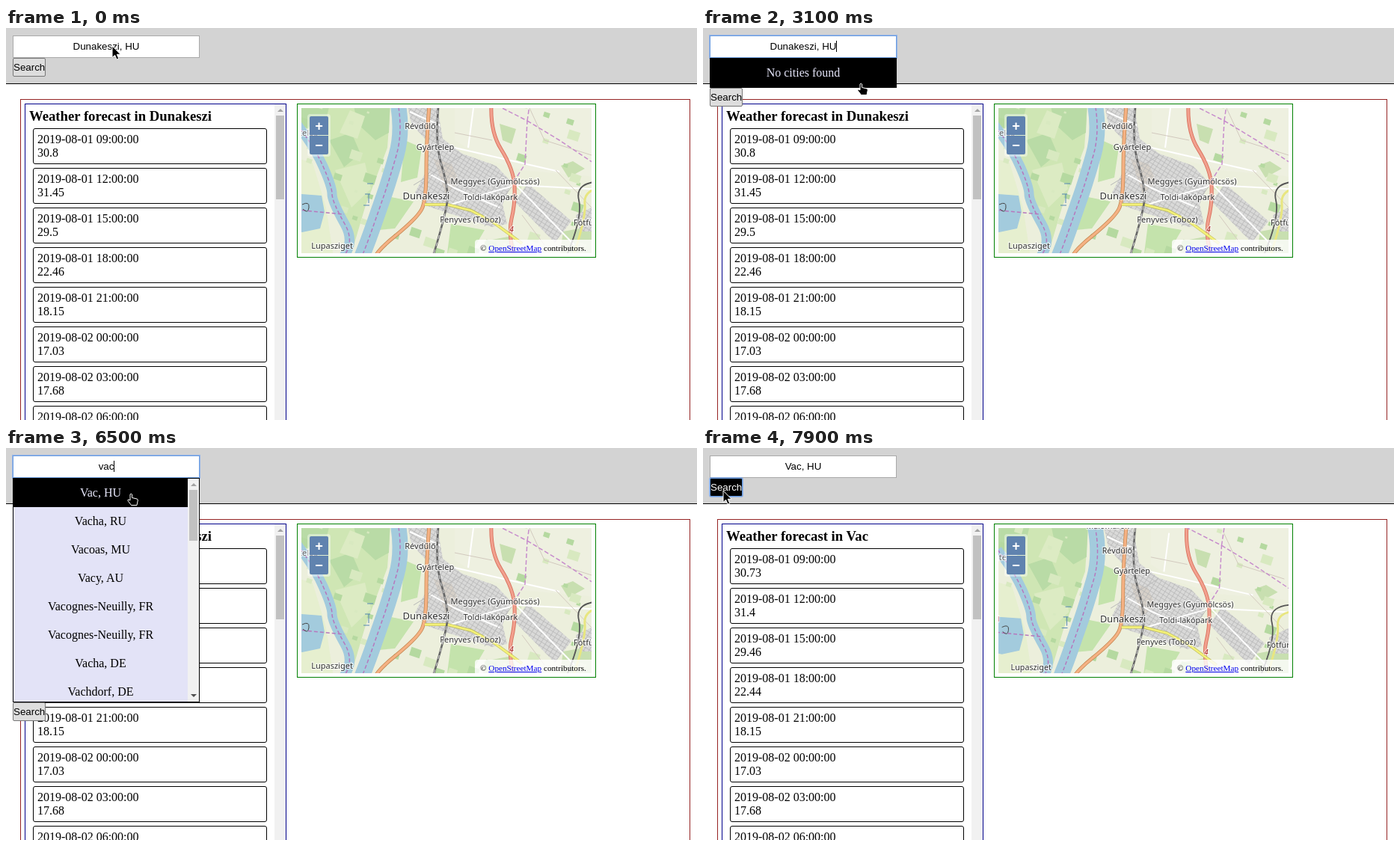
Recreate the animation shown at these times as an HTML page. Size 924 by 524 pixels, loop 8000 ms.

```html
<!DOCTYPE html>
<html lang="en">
<head>
<meta charset="utf-8">
<title>Weather forecast</title>
<style>
* { box-sizing: border-box; }
html, body { margin: 0; width: 100%; height: 100%; overflow: hidden; background: #fff; }
body { position: relative; font: 16px/18px "Liberation Serif", serif; color: #000; }
body > *, .box { position: absolute; }
#header { left: 0; top: 0; width: 924px; height: 75px; background: #d3d3d3; border-bottom: 1px solid #000; }
#frame { left: 19px; top: 95px; width: 896px; height: 500px; border: 1px solid #952323; }
#panel { left: 25px; top: 101px; width: 350px; height: 500px; border: 1px solid #00008b; background: #fff; }
#panel h3 { margin: 0; position: absolute; left: 5px; top: 5px; font-size: 18.72px; line-height: 21px; white-space: nowrap; }
.row { position: absolute; left: 10px; width: 313px; height: 48px; padding: 5px; border: 1px solid #000; border-radius: 3px; }
.bar { position: absolute; right: 0; top: 0; width: 15px; height: 100%; background: #f1f1f1; }
.bar b { position: absolute; left: 2px; top: 15px; width: 11px; background: #c1c1c1; }
.bar::before, .bar.both::after { content: ""; position: absolute; left: 3.5px; top: 6px; border: 4px solid transparent; border-top: 0; border-bottom-color: #a3a3a3; }
.bar.both::after { top: auto; bottom: 6px; border: 4px solid transparent; border-bottom: 0; border-top-color: #505050; }
#mapbox { left: 389px; top: 101px; width: 400px; height: 206px; border: 1px solid #008000; background: #fff; }
#map { position: absolute; left: 5px; top: 5px; width: 388px; height: 194px; }
#map text { font-family: "Noto Sans", sans-serif; font-size: 11px; text-anchor: middle; fill: #333; stroke: #fff; stroke-opacity: .65; stroke-width: 2.4px; paint-order: stroke; }
.zoom { position: absolute; left: 13px; top: 13px; width: 31px; height: 57px; border-radius: 4px; background: rgba(255,255,255,.4); }
.zoom b { position: absolute; left: 3px; width: 25px; height: 25px; background: #6083af; color: #fff; font: bold 18.24px/25px "Liberation Sans", sans-serif; text-align: center; }
.credit { position: absolute; left: 237px; top: 181px; width: 156px; height: 18px; padding: 2px 7px; background: rgba(255,255,255,.8); border-radius: 4px 0 0; font-size: 11.2px; line-height: 18px; white-space: nowrap; }
.credit span { color: #00e; text-decoration: underline; }
#field, #search { font: 13.333px "Liberation Sans", sans-serif; text-align: center; white-space: pre; }
#field { left: 9px; top: 10px; width: 250px; height: 30px; border: 1px solid #a9a9a9; background: #fff; line-height: 28px; }
#field i { display: inline-block; width: 1px; height: 15px; margin-right: -1px; vertical-align: -3px; background: #000; }
#field mark { background: #3d8ae0; color: #fff; }
#field.focus, #search.focus { border-color: #6b9de0; box-shadow: 0 0 0 1px rgba(77,144,254,.45); }
#search { left: 9px; width: 44px; height: 25px; border: 1px solid #777; border-radius: 2px; background: #ddd; line-height: 23px; }
#search.hover { background: #000; color: #fff; }
#list { left: 9px; top: 40px; width: 250px; border: 1px solid #000; overflow: hidden; background: #e3e3f7; text-align: center; }
#list p { margin: 0; height: 38px; line-height: 38px; white-space: nowrap; }
#list.scroll p { margin-right: 15px; }
#list.hover p:first-child { background: #000; color: #e6e6fa; }
#cursor { left: 0; top: 0; overflow: visible; width: 1px; height: 1px; }
</style>
</head>
<body>
<div id="header"></div>
<div id="frame"></div>
<div id="panel"><h3></h3><div id="rows"></div><div class="bar"><b style="height:112px"></b></div></div>
<div id="mapbox">
  <svg id="map" viewBox="395 107 388 194"><g id="world"></g></svg>
  <div class="zoom"><b style="top:3px;border-radius:2px 2px 0 0">+</b><b style="top:29px;border-radius:0 0 2px 2px">−</b></div>
  <div class="credit">© <span>OpenStreetMap</span> contributors.</div>
</div>
<div id="field"></div>
<div id="list"></div>
<div id="search">Search</div>
<svg id="cursor"><path stroke-linejoin="round"/></svg>
<script>
const $ = s => document.querySelector(s);
const LOOP = 8000;

// Map
const areas = [
  ['#cfe6b4', 'M375 90H515L510 160 480 240 462 301 440 220 400 130Z'],
  ['#e6efcf', 'M375 170L410 180 428 240 440 320H375Z'],
  ['#b9dba6', 'M375 90H436L428 122 405 132 375 122Z M462 90H514L512 140 494 150 470 128Z M432 150L462 140 474 168 452 186Z'],
  ['#dcebc3', 'M440 190L480 180 488 215 462 240Z M460 110L480 118 470 148 446 140Z'],
  ['#c4e3ac', 'M533 150L556 160 550 200 528 206Z M510 225L545 232 520 268 498 270Z M595 262L640 270 622 301 590 301Z M600 107H640L634 125 608 128Z'],
  ['#eef0e0', 'M600 90H800V200L690 190 640 175 600 150Z'],
  ['#c8dfb0', 'M660 128L682 135 676 155 664 150Z M742 184L758 178 774 188 752 200Z M640 285L676 278 690 320H636Z M745 272L800 262V320H738Z'],
  ['#d9d9d8', 'M534 90H574L584 148 610 168 655 184 676 206 664 236 670 262 650 266 600 250 563 238 547 220 560 195 562 150 542 128Z'],
  ['#d9d9d8', 'M698 208L756 258 734 287 680 232Z M762 250L800 232V272H768Z'],
  ['#d6d0c8', 'M572 175L596 182 606 206 588 222Z']
];
const left = 'M390 130Q412 158 424 185T436 222T453 262T442 315';
const right = 'M522 90Q532 135 522 170T505 225T490 268T472 315';
const lake = 'M380 221L422 224 426 246 420 268 396 273 380 270Z';
const link = 'M380 242L430 247 452 249';
const motorway = 'M650 90Q645 135 662 162T680 212T676 255T681 315';
const rail = 'M580 90Q572 150 582 182T590 232T568 315';
const ring = 'M800 205Q760 205 766 230T745 315';
const main = 'M567 90Q562 150 562 190T556 242T518 280T494 315';
const local = 'M560 236L590 236 622 244 652 260 690 288';
const border = 'M640 95L697 124 694 182 680 204M697 124L740 150 800 190M697 124L702 90';
const lines = [
  ['#a3cbdd', 13, left], ['#a3cbdd', 21, right],
  ['#fff', 2, 'M588 238L640 222 682 210 800 216M600 160L740 192M682 210L760 290M540 112L580 130M566 195L600 214 660 240M625 107L618 160'],
  ['#d2c9be', 1, 'M700 107L720 150 783 170M600 140L650 150M735 190L783 240M690 250L720 290'],
  ['#b8b8b8', 1, 'M545 210L610 170M640 265L676 212'],
  ['#c48a54', 5, main], ['#f5b183', 3.4, main],
  ['#d8705c', 5, motorway], ['#f2a08e', 3.2, motorway],
  ['#b5b45a', 4, local], ['#f3f078', 2.8, local],
  ['#e8e680', 3, 'M800 214Q772 215 774 235T755 315'],
  ['#666', 2.6, rail], ['#ddd', 1, rail, '5 5'],
  ['#555', 1.8, ring],
  ['#b678bd', 1.5, left, '5 3'], ['#b678bd', 1.5, right, '5 3'],
  ['#b678bd', 1.5, link, '5 3'], ['#c78ccc', 1.5, border, '6 3'],
  ['#5587b3', 1, 'M483 208h8M480 222h7M478 237h8M485 222v12'],
  ['#444', 1, 'M396 236q10 -5 9 4t-8 2']
];
const labels = [
  ['Révdűlő', 554, 135], ['Gyártelep', 574, 163], ['Meggyes (Gyümölcsös)', 654, 209],
  ['Toldi-lakópark', 648, 230], ['Dunakeszi', 562, 229, 'font-size:13px'],
  ['Fenyves (Toboz)', 621, 260], ['Lupasziget', 436, 295],
  ['Fótfürdő', 759, 264, 'text-anchor:start'], ['Pannóniatelep', 418, 144, 'text-anchor:end;fill:#666'],
  ['Malomárok', 541, 101], ['1', 391, 228, 'fill:#b33;font-size:10px'],
  ['4', 676, 273, 'fill:#a22;font-size:10px;font-style:italic']
];
const stroke = ([color, width, d, dash]) =>
  `<path d="${d}" fill="none" stroke="${color}" stroke-width="${width}" stroke-dasharray="${dash || 'none'}"/>`;

// Seeded scatter of small groves
let seed = 7;
const rnd = () => (seed = seed * 16807 % 2147483647) / 2147483647;
let groves = '';
for (let i = 0; i < 70; i++) {
  const x = 380 + rnd() * 415, y = 95 + rnd() * 215, w = 3 + rnd() * 12;
  if (x > 535 && x < 680 && y < 265) continue;
  groves += `<path d="M${x} ${y}l${w} ${w / 3} ${-w / 4} ${w * .8} ${-w} ${-w / 3}z" fill="${rnd() < .5 ? '#b5d9a0' : '#d8e9c0'}"/>`;
}
$('#world').innerHTML =
  `<defs><pattern id="streets" width="6" height="5" patternUnits="userSpaceOnUse" patternTransform="rotate(32)">
    <path d="M0 .5H6M.5 0V5" stroke="#b5b5b5" stroke-width=".7"/></pattern></defs>
  <rect x="370" y="80" width="440" height="250" fill="#ecefdc"/>` +
  areas.slice(0, 7).map(([c, d]) => `<path fill="${c}" d="${d}"/>`).join('') + groves +
  areas.slice(7).map(([c, d]) => `<path fill="${c}" d="${d}"/><path fill="url(#streets)" d="${d}"/>`).join('') +
  `<path fill="#a3cbdd" d="${lake}"/>` + lines.map(stroke).join('') +
  labels.map(([s, x, y, css = '']) => `<text x="${x}" y="${y}" style="${css}">${s}</text>`).join('');

// Forecast
const temps = {
  Dunakeszi: ['30.8', '31.45', '29.5', '22.46'],
  Vac: ['30.73', '31.4', '29.46', '22.44']
};
const later = ['18.15', '17.03', '17.68', '19.9'];
const rowsHtml = city => [...temps[city], ...later].map((temp, i) => {
  const hour = String((9 + 3 * i) % 24).padStart(2, '0');
  return `<div class="row" style="top:${32 + 53 * i}px">2019-08-0${i < 5 ? 1 : 2} ${hour}:00:00<br>${temp}</div>`;
}).join('');

// Suggestions: thumb height (0 for no scrolling) and entries
const lists = {
  none: [0, []],
  empty: [0, ['No cities found']],
  v: [41, ['Vinogradovo, RU', 'Vavibet, RU', 'Verkhneye Shchekotikhino, RU', 'Vernon Parish, US', 'Visé, BE', 'Villazon, BO', 'Ville de Kinshasa, CD', 'Vitré, FR']],
  va: [41, ['Vavibet, RU', 'Vac, HU', 'Vacha, RU', 'Valga, EE', 'Vacoas, MU', 'Varna, BG', 'Valdivia, CL', 'Vantaa, FI']],
  vac: [68, ['Vac, HU', 'Vacha, RU', 'Vacoas, MU', 'Vacy, AU', 'Vacognes-Neuilly, FR', 'Vacognes-Neuilly, FR', 'Vacha, DE', 'Vachdorf, DE']]
};

// Tracks: [start, ...values]
const city = 'Dunakeszi, HU';
const fieldTrack = [ // text, caret index, selection start
  [0, city], [1300, city, 9], [1700, city], [2300, city, 9], [2500, city, 10],
  [2800, city, 11], [3000, city, 12], [3100, city, 13], [3600, city, -1, 11],
  [3800, city, -1, 0], [4800, 'v', 1], [5500, 'va', 2], [5900, 'vac', 3], [6600, 'Vac, HU']
];
const listTrack = [[0, 'none'], [1500, 'empty'], [5300, 'v'], [5600, 'va'], [6000, 'vac'], [6600, 'none']];
const cursorTrack = [
  [0, 'arrow', 142, 24], [300, 'beam', 145, 27], [400, 'beam', 148, 27], [600, 'beam', 150, 27],
  [700, 'beam', 152, 27], [1000, 'beam', 153, 27], [1500, 'beam', 165, 33], [1600, 'hand', 190, 56],
  [1700, 'hand', 206, 73], [6500, 'hand', 162, 60], [6600, 'arrow', 167, 60], [7000, 'arrow', 150, 59],
  [7100, 'arrow', 105, 58], [7200, 'arrow', 62, 57], [7300, 'arrow', 37, 57], [7600, 'arrow', 30, 57],
  [7800, 'arrow', 27, 57]
];
const cursors = { // path, fill, stroke
  arrow: ['M0 0V15.5L3.6 12.3 6 18.2 8.8 17 6.3 11.3H11Z', '#000', '#fff'],
  beam: ['M-3 -8Q0 -8 .5 -7Q1 -8 4 -8M.5 -7V7M-3 8Q0 8 .5 7Q1 8 4 8', 'none', '#000'],
  hand: ['M4 10V2Q5.3 .3 6.6 2V6.5L13 8Q14.5 8.4 14.3 10L13 16.5H5.5L1 10.5Q.5 8.8 2 9Z', '#000', '#fff']
};
const at = (track, t) => track.filter(k => k[0] <= t).pop().slice(1);

// Only touch the page when a part changes
const shown = {};
const update = (name, key, draw) => {
  if (shown[name] !== key) { shown[name] = key; draw(); }
};

function drawField([text, caret = -1, sel = -1]) {
  const cut = sel >= 0 ? sel : caret >= 0 ? caret : text.length;
  const tail = text.slice(cut);
  $('#field').innerHTML = text.slice(0, cut) + (sel >= 0 ? `<mark>${tail}</mark>` : (caret >= 0 ? '<i></i>' : '') + tail);
}

function drawList(name) {
  const [thumb, items] = lists[name], el = $('#list');
  const height = thumb ? 300 : items.length * 40;
  el.style.display = height ? 'block' : 'none';
  el.style.height = height + 'px';
  el.classList.toggle('scroll', thumb > 0);
  el.innerHTML = items.map(s => `<p>${s}</p>`).join('') +
    (thumb ? `<div class="bar both"><b style="height:${thumb}px"></b></div>` : '');
  $('#search').style.top = 40 + height + 'px';
}

function drawCursor([kind, x, y]) {
  const [d, fill, line] = cursors[kind], path = $('#cursor path');
  path.setAttribute('d', d);
  path.setAttribute('fill', fill);
  path.setAttribute('stroke', line);
  path.setAttribute('transform', `translate(${x} ${y})`);
}

function render(t) {
  const field = at(fieldTrack, t), [list] = at(listTrack, t), cursor = at(cursorTrack, t);
  const town = t < 7800 ? 'Dunakeszi' : 'Vac';
  update('field', field.join(), () => drawField(field));
  update('list', list, () => drawList(list));
  update('cursor', cursor.join(), () => drawCursor(cursor));
  update('town', town, () => {
    $('h3').textContent = 'Weather forecast in ' + town;
    $('#rows').innerHTML = rowsHtml(town);
  });
  $('#field').classList.toggle('focus', t >= 1300 && t < 6600);
  $('#list').classList.toggle('hover', t >= 1600);
  $('#search').classList.toggle('hover', t >= 7300);
  $('#search').classList.toggle('focus', t >= 7600);
  $('#world').setAttribute('transform', t < 7900 ? '' : 'translate(13.2 9.2) scale(.976)');
}

const start = performance.now();
function tick() {
  render((performance.now() - start) % LOOP);
  requestAnimationFrame(tick);
}
tick();
</script>
</body>
</html>
```
